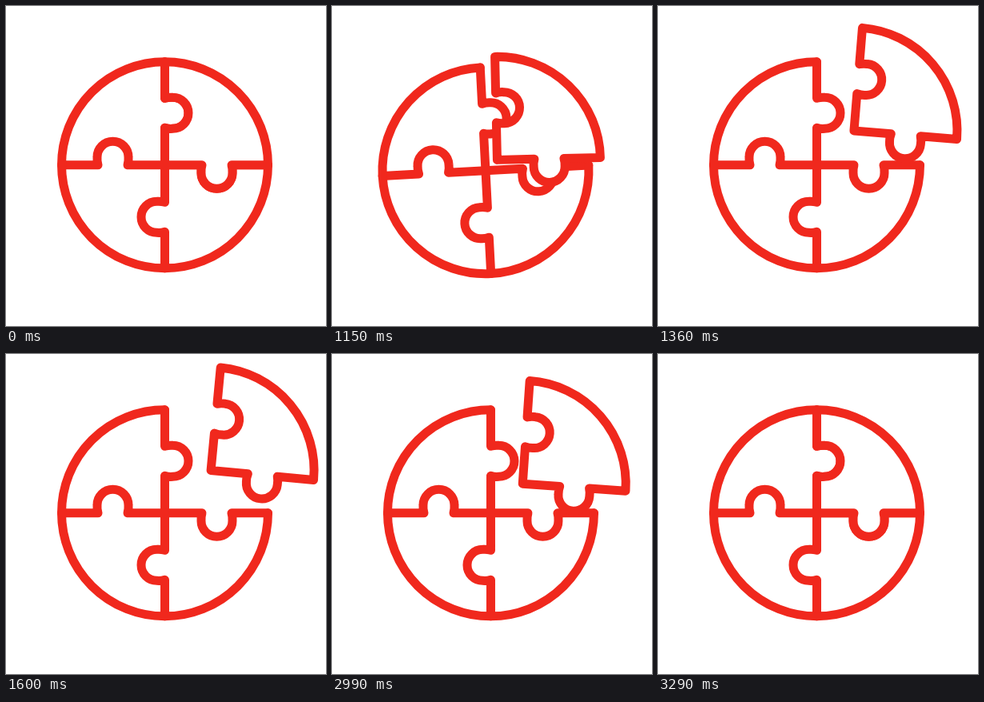
These frames come from a looping animation (400 by 400 pixels, 3320 ms). An HTML page:

```html
<!DOCTYPE html>
<html lang="en">
<head>
<meta charset="utf-8">
<title>Puzzle circle</title>
<style>
  html, body { margin: 0; width: 100%; height: 100%; overflow: hidden; background: #fff; }
  svg { display: block; width: 100vw; height: 100vh; }
  g, path { fill: none; stroke: #f0281d; stroke-width: 11; stroke-linecap: round; stroke-linejoin: round; }
  #piece { fill: #fff; }
</style>
</head>
<body>
<svg viewBox="0 0 400 400">
  <defs>
    <path id="edge" d="M0-129V-83.5Q5-85 10-84.5A19.5 19.5 0 0 1 10-45.5Q5-45 0-46.5V0"/>
  </defs>
  <g id="body">
    <use href="#edge"/>
    <use href="#edge" transform="rotate(90)"/>
    <use href="#edge" transform="rotate(180)"/>
    <use href="#edge" transform="rotate(270)"/>
    <path d="M129 0A129 129 0 1 1 0-129"/>
  </g>
  <path id="piece" d="M0-129V-83.5Q5-85 10-84.5A19.5 19.5 0 0 1 10-45.5Q5-45 0-46.5V0
    H46.5Q45 5 45.5 10A19.5 19.5 0 0 0 84.5 10Q85 5 83.5 0H129A129 129 0 0 0 0-129Z"/>
</svg>
<script>
const LOOP = 3320, STEP = 30, MOVE = 630, PUSH = 120, SETTLE = 190;
const OUT_START = 1000, BACK_START = 2660;
const CENTER = { x: 198.5, y: 198.8 };
const REST = { x: 0, y: 0, r: 0 };
const PUSHED = { x: -9.2, y: 9.8, r: -5 };
const APART = { x: 57.7, y: -53.5, r: 5.4 };

const body = document.getElementById('body');
const piece = document.getElementById('piece');
const clamp = (v, max) => Math.max(0, Math.min(max, v));
const mix = (a, b, k) => a + (b - a) * k;

function blend(a, b, move, turn = move) {
  return { x: mix(a.x, b.x, move), y: mix(a.y, b.y, move), r: mix(a.r, b.r, turn) };
}

function place(el, p) {
  el.setAttribute('transform', `translate(${CENTER.x + p.x} ${CENTER.y + p.y}) rotate(${p.r})`);
}

// Time since a move began, in whole steps; 1 ms of slack absorbs clock rounding.
function elapsed(t, from) {
  return clamp(Math.floor((t - from + 1) / STEP) * STEP, MOVE);
}

// The way back is the way out played in reverse.
function draw(ms) {
  const t = ms % LOOP;
  const m = elapsed(t, OUT_START) - elapsed(t, BACK_START);

  if (m <= PUSH) {
    const p = blend(REST, PUSHED, Math.pow(m / PUSH, 0.8));
    place(body, p);
    place(piece, p);
    return;
  }
  const left = 1 - clamp((m - PUSH) / SETTLE, 1);
  place(body, blend(REST, PUSHED, left ** 2, left ** 3));

  const rem = 1 - Math.pow((m - PUSH) / (MOVE - PUSH), 0.7);
  place(piece, blend(APART, PUSHED, rem ** 2, rem ** 3));
}

const start = performance.now();
function tick() {
  draw(performance.now() - start);
  requestAnimationFrame(tick);
}
tick();
</script>
</body>
</html>
```
